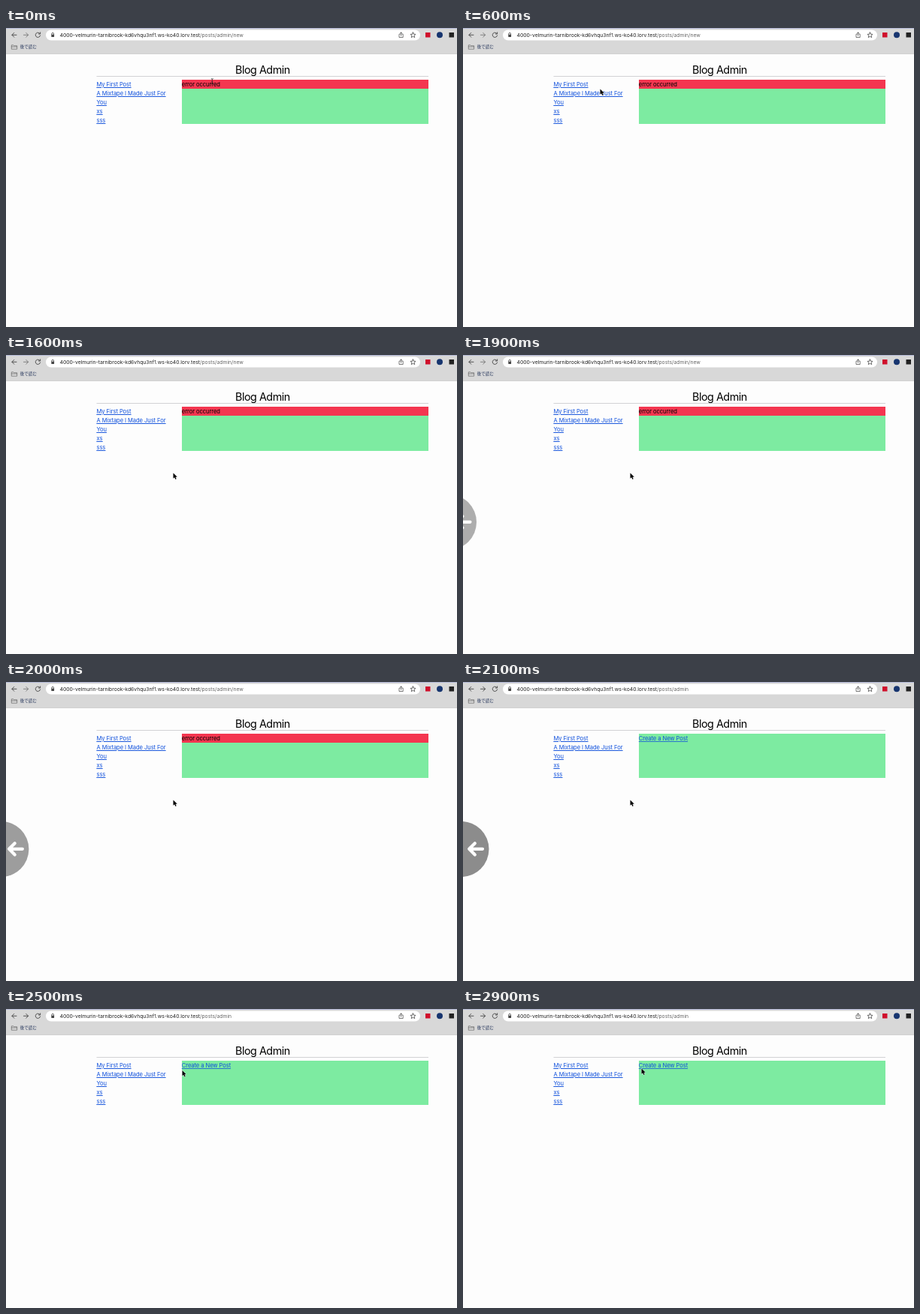
An HTML page for the animation above (3000 ms loop, 600 by 399 pixels).

```html
<!DOCTYPE html>
<html lang="en">
<head>
<meta charset="utf-8">
<title>Blog Admin</title>
<style>
  html, body { margin: 0; width: 100%; height: 100%; overflow: hidden; background: #fdfdfd; }
  svg { display: block; width: 600px; height: 399px; }
  text { font: 7.6px Inter, sans-serif; letter-spacing: -.08px; white-space: pre; }
  .url { font-size: 6.8px; letter-spacing: 0; }
  .title { font-size: 14.3px; letter-spacing: -.45px; }
  .bookmark { font: 5.5px "Noto Sans CJK JP", "Noto Sans CJK", sans-serif; letter-spacing: 0; }
  .link { fill: #0f50dc; text-decoration: underline; text-decoration-thickness: .6px; }
  .icon { fill: none; stroke: #444; stroke-width: .9; stroke-linecap: round; stroke-linejoin: round; }
</style>
</head>
<body>
<svg viewBox="0 0 600 399">
  <rect width="600" height="399" fill="#fdfdfd"/>

  <!-- browser bar -->
  <rect width="600" height="34.5" fill="#d8d8d8"/>
  <rect width="600" height="1" fill="#b3b8d6"/>
  <rect y="34" width="600" height=".7" fill="#c6c6c6"/>
  <rect x="53" y="2.5" width="498" height="14" rx="7" fill="#fff"/>
  <g class="icon">
    <path d="M14 9.3H8M10.8 6.4 7.9 9.3l2.9 2.9"/>
    <path id="forward" d="M23.5 9.3h6M26.700 6.4l2.9 2.9-2.9 2.9"/>
    <path d="M45.2 7.600a3.200 3.200 0 1 0 .4 2.400M45.600 5.800v2.200h-2.200"/>
    <path d="M60.900 8.600V7.700a1.300 1.300 0 0 1 2.600 0v.9"/>
    <rect x="60.300" y="8.700" width="3.800" height="3.200" rx=".4" fill="#444" stroke="none"/>
    <path d="M524.300 8.200h-1.300v4.300h5.200V8.200h-1.300M525.600 10.300V5.900M524.200 7.200l1.400-1.400 1.400 1.400" stroke-width=".7"/>
    <path d="m541.500 5.900 1 2.300 2.500.2-1.900 1.700.6 2.500-2.200-1.300-2.200 1.300.6-2.500-1.900-1.700 2.500-.2z" stroke-width=".8"/>
    <path d="M7.300 27.800v-5h2.600l.8.900h3.900v4.100zM7.300 25h7.300" stroke="#666" stroke-width=".7"/>
  </g>
  <rect x="558" y="6" width="6.500" height="6.500" fill="#d0102c"/>
  <circle cx="577" cy="9.300" r="4" fill="#17356f"/>
  <rect x="589.500" y="6" width="6.500" height="6.500" fill="#222"/>
  <text class="url" x="258" y="11.800" text-anchor="end" fill="#222">4000-velmurin-tarnibrook-kd6vhqu3nf1.ws-ko40.lorv.test</text>
  <text class="url" id="path" x="258" y="11.800" fill="#666"></text>
  <text class="bookmark" x="18.700" y="27.200" fill="#27375c">後で読む</text>

  <!-- page -->
  <text class="title" x="305" y="61">Blog Admin</text>
  <rect x="120.500" y="64.200" width="441.500" height=".8" fill="#c9c9cc"/>
  <g class="link">
    <text class="link" x="120.500" y="78">My First Post</text>
    <text class="link" x="120.500" y="90">A Mixtape I Made Just For</text>
    <text class="link" x="120.500" y="102">You</text>
    <text class="link" x="120.500" y="114">xs</text>
    <text class="link" x="120.500" y="126">sss</text>
  </g>
  <rect x="234" y="69" width="328" height="59" fill="#7deba1"/>
  <g id="error">
    <rect x="234" y="69" width="328" height="12" fill="#f43650"/>
    <text x="233.800" y="78">error occurred</text>
  </g>
  <text class="link" id="create" x="233.800" y="78">Create a New Post</text>

  <!-- swipe-back badge -->
  <g id="badge">
    <circle id="disc" cx="-2.500" cy="223" r="37"/>
    <path d="M26 222.800H9M15.800 215.200l-7.600 7.600 7.600 7.600" fill="none" stroke="#fff" stroke-width="4.200" stroke-linecap="round" stroke-linejoin="round"/>
  </g>

  <path id="beam" d="M272.800 67.500q1.500 0 1.500 1.200v5q0 1.200-1.500 1.200M275.800 67.500q-1.500 0-1.500 1.200M275.800 74.900q-1.500 0-1.500-1.200M273.500 71.800h1.600" fill="none" stroke="#222" stroke-width=".7"/>
  <path id="arrow" d="M0 0v7.300l1.700-1.600 1.200 2.700 1.300-.6L3 5.200h2.300z" stroke="#fff" stroke-width=".8" paint-order="stroke"/>
</svg>
<script>
const LOOP = 3000, STEP = 100;
const $ = id => document.getElementById(id);
const show = (id, on) => $(id).setAttribute("visibility", on ? "visible" : "hidden");
const progress = (t, from, to) => Math.min(1, Math.max(0, (t - from) / (to - from)));
const smooth = p => p * p * (3 - 2 * p);
const mix = (a, b, p) => a + (b - a) * p;

// Pointer stops: time, x, y
const stops = [
  [0, 274, 71], [300, 222, 172], [600, 182.500, 81.500],
  [1100, 222.500, 157.500], [2100, 222.500, 157.500],
  [2500, 234.500, 82], [2900, 237.500, 79.500], [LOOP, 237.500, 79.500]
];

function pointer(t) {
  const i = stops.findIndex((s, k) => k > 0 && t <= s[0]);
  const [t0, x0, y0] = stops[i - 1], [t1, x1, y1] = stops[i];
  const p = progress(t, t0, t1);
  return [mix(x0, x1, p), mix(y0, y1, smooth(p))];
}

function draw(t) {
  const wentBack = t >= 2100;
  $("path").textContent = wentBack ? "/posts/admin" : "/posts/admin/new";
  $("forward").setAttribute("stroke", wentBack ? "#444" : "#777");
  show("error", !wentBack);
  show("create", wentBack);

  const slide = 1 - progress(t, 1900, 2100);
  show("badge", t >= 1900 && t < 2400);
  $("badge").setAttribute("transform", `translate(${-16.5 * slide * slide})`);
  $("badge").setAttribute("opacity", 1 - progress(t, 2100, 2400));
  const shade = mix(140, 173, slide);
  $("disc").setAttribute("fill", `rgb(${shade},${shade},${shade})`);

  show("beam", t < STEP);
  show("arrow", t >= STEP);
  $("arrow").setAttribute("transform", `translate(${pointer(t)})`);
}

function tick() {
  draw(Math.floor(performance.now() % LOOP / STEP) * STEP);
  requestAnimationFrame(tick);
}
tick();
</script>
</body>
</html>
```
